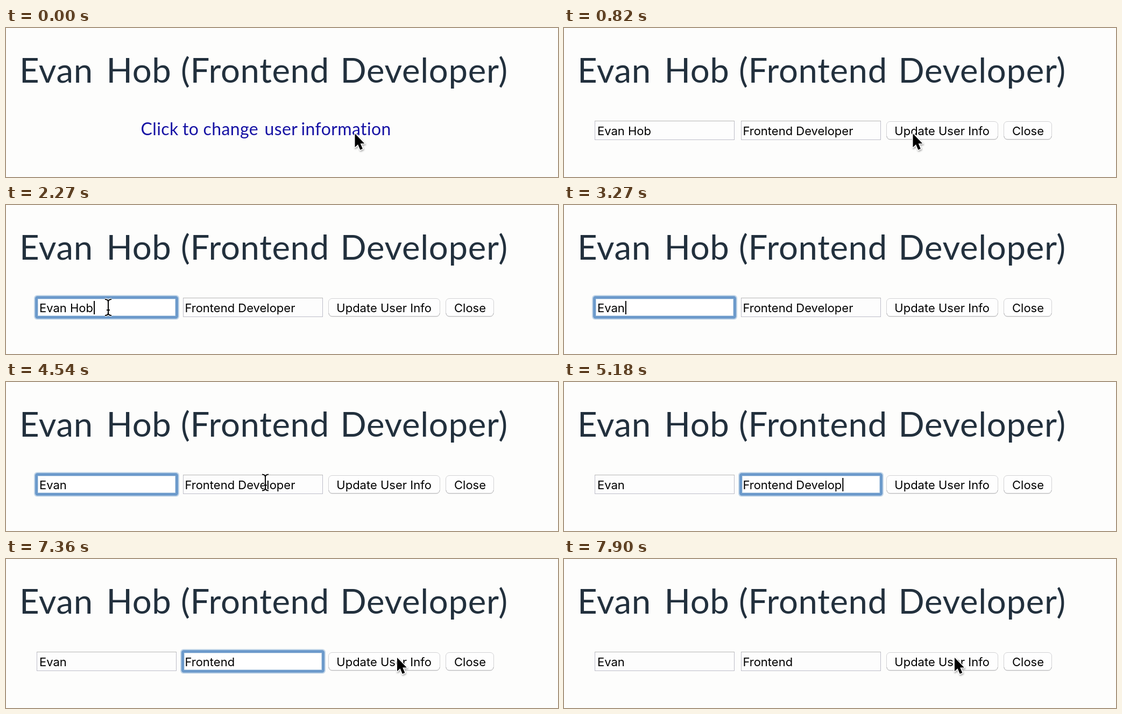
An HTML page that plays this animation: 1026x278 px, repeating every 7990 ms.

```html
<!DOCTYPE html>
<html lang="en">
<head>
<meta charset="utf-8">
<title>Edit user info</title>
<style>
  html, body { margin: 0; width: 100%; height: 100%; overflow: hidden; background: #fdfdfc; }
  svg { display: block; width: 1026px; height: 278px; }
  text { white-space: pre; }
  .title { font: 63.5px Lato, sans-serif; letter-spacing: .65px; fill: #22303d; }
  .link { font: 32px Lato, sans-serif; letter-spacing: .4px; fill: #1612a4; }
  .ui { font: 22px Inter, sans-serif; fill: #000; }
  .box { fill: #fdfdfd; stroke: #bdbdc8; }
  .edge { stroke: #b6b6b4; }
  .button { fill: #fefefe; stroke: #d2d2d4; }
  .lip { fill: none; stroke: #b9b9bb; }
  .halo { fill: #c3d6e8; }
  .ring { fill: #fff; stroke: #6c9acb; stroke-width: 5; }
  .glow { fill: none; stroke: #cfdfec; }
  .ink { stroke-linejoin: round; }
</style>
</head>
<body>
<svg viewBox="0 0 1026 278">
  <defs>
    <filter id="soft" x="-50%" y="-50%" width="220%" height="220%">
      <feDropShadow dx="1" dy="2" stdDeviation="1.6" flood-color="#000" flood-opacity=".35"/>
    </filter>
    <path id="beam" d="M-6-15Q0-15 0-10V10Q0 15-6 15M6-15Q0-15 0-10M6 15Q0 15 0 10M-3 5H3" fill="none"/>
  </defs>

  <text class="title" y="102"><tspan x="25">Evan</tspan><tspan x="186.5">Hob</tspan><tspan x="325">(Frontend</tspan><tspan x="621.5">Developer)</tspan></text>

  <text id="link" class="link" y="200"><tspan x="250.5">Click</tspan><tspan x="328">to</tspan><tspan x="366.5">change</tspan><tspan x="480.5">user</tspan><tspan x="548.5">information</tspan></text>

  <g id="form">
    <g id="fields"></g>
    <g id="buttons"></g>
  </g>

  <g id="arrow">
    <path class="ink" filter="url(#soft)" d="M0 0V25.5L5.6 20.3L9.8 30.2L14.4 28.2L10.2 18.6H17.8Z"
      fill="#000" stroke="#fff" stroke-width="3" paint-order="stroke"/>
  </g>
  <g id="ibeam">
    <use href="#beam" stroke="#fff" stroke-width="4.5"/>
    <use href="#beam" stroke="#000" stroke-width="2"/>
  </g>
</svg>
<script>
const LOOP = 7990, STEP = 90.8;
const OPEN = 750;
const $ = id => document.getElementById(id);

// Each field: focus span, then keep-length reached by repeated deletes.
const fields = [
  { x: 57, textX: 62, text: "Evan Hob", keep: 4, focus: 1950, blur: 4800, first: 2640, gap: 120 },
  { x: 329, textX: 332.4, text: "Frontend Developer", keep: 8, focus: 4800, blur: 7700, first: 5080, gap: 80 }
];
const buttons = [
  { x: 599, w: 208, textX: 614.3, text: "Update User Info" },
  { x: 817, w: 90, textX: 833, text: "Close" }
];

// Pointer stops: time, x, y
const stops = [
  [0, 648.5, 197], [880, 648.5, 197], [1450, 331, 182.5], [1880, 190, 191],
  [4180, 190, 191], [4540, 482, 187.5], [4760, 556, 190],
  [6640, 556, 190], [7250, 727, 184], [7600, 727, 184], [7750, 726, 184]
];
const hiddenSpans = [[2640, 4150], [5080, 6600]];

$("fields").innerHTML = fields.map(f => `
  <g>
    <g>
      <rect class="box" x="${f.x + .5}" y="173.5" width="259" height="35"/>
      <path class="edge" d="M${f.x} 173.5h260"/>
    </g>
    <g>
      <rect class="halo" x="${f.x - 5}" y="168" width="270" height="46" rx="6"/>
      <rect class="ring" x="${f.x - .5}" y="172.5" width="261" height="37" rx="2"/>
      <rect class="glow" x="${f.x + 2.5}" y="175.5" width="255" height="31"/>
    </g>
    <text class="ui" x="${f.textX}" y="200"></text>
    <rect y="179" width="2" height="25"/>
  </g>`).join("");

$("buttons").innerHTML = buttons.map(b => `
  <rect class="button" x="${b.x + .5}" y="174.5" width="${b.w - 1}" height="33" rx="6.5"/>
  <path class="lip" d="M${b.x + 1} 202q1 6 6 6h${b.w - 14}q5 0 6-6"/>
  <text class="ui" x="${b.textX}" y="200">${b.text}</text>`).join("");

[...$("fields").children].forEach((g, i) => {
  const [plain, ring, label, caret] = g.children;
  Object.assign(fields[i], { plain, ring, label, caret });
});

const show = (el, on) => el.setAttribute("visibility", on ? "inherit" : "hidden");
const clamp = (v, lo, hi) => Math.min(hi, Math.max(lo, v));

function pointerAt(t) {
  const i = stops.findIndex(s => s[0] > t);
  if (i < 0) return stops[stops.length - 1].slice(1);
  const [t0, x0, y0] = stops[i - 1], [t1, x1, y1] = stops[i];
  const u = (t - t0) / (t1 - t0), e = u * u * (3 - 2 * u);
  return [x0 + (x1 - x0) * e, y0 + (y1 - y0) * e];
}

function drawField(f, t) {
  const focused = t >= f.focus && t < f.blur;
  const deletes = clamp(Math.floor((t - f.first) / f.gap) + 1, 0, f.text.length - f.keep);
  const lastKey = deletes ? f.first + (deletes - 1) * f.gap : f.focus;
  f.label.textContent = f.text.slice(0, f.text.length - deletes);
  f.caret.setAttribute("x", f.textX + f.label.getComputedTextLength() + 1);
  show(f.plain, !focused);
  show(f.ring, focused);
  show(f.caret, focused && (t - lastKey) % 1000 < 500);
}

function drawPointer(t, open) {
  const [x, y] = pointerAt(t);
  const hidden = hiddenSpans.some(([a, b]) => t >= a && t < b);
  const overField = open && fields.some(f => x >= f.x && x <= f.x + 260);
  for (const id of ["arrow", "ibeam"]) {
    $(id).setAttribute("transform", `translate(${x} ${y})`);
    show($(id), !hidden && overField === (id === "ibeam"));
  }
}

function draw(now) {
  const t = Math.floor((now % LOOP + 5) / STEP) * STEP;
  const open = t >= OPEN;
  $("link").setAttribute("visibility", open ? "hidden" : "visible");
  $("form").setAttribute("visibility", open ? "visible" : "hidden");
  fields.forEach(f => drawField(f, t));
  drawPointer(t, open);
}

let start;
function tick(now) {
  start ??= now;
  draw(now - start);
  requestAnimationFrame(tick);
}
draw(0);
requestAnimationFrame(tick);
</script>
</body>
</html>
```
